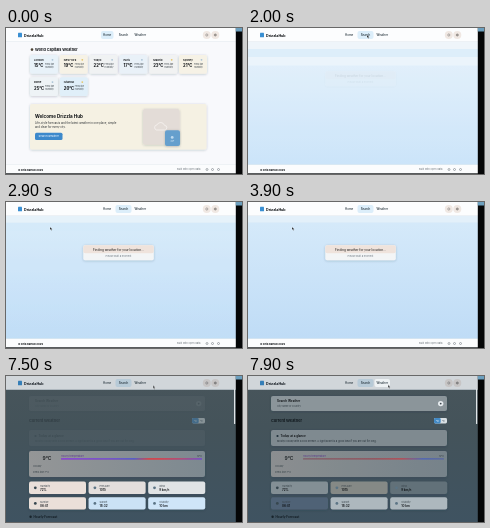
Animation of 236x146 px, one loop 8 s. Source, as an HTML page:

```html
<!DOCTYPE html>
<html lang="en">
<head>
<meta charset="utf-8">
<title>DrizzlaHub</title>
<style>
  html, body { margin: 0; width: 100%; height: 100%; overflow: hidden; background: #050607; }
  svg { display: block; width: 100vw; height: 100vh; }
  text { font-family: Inter, Roboto, sans-serif; }
</style>
</head>
<body>
<svg id="stage" viewBox="0 0 236 146" preserveAspectRatio="none">
  <defs>
    <linearGradient id="sky" x2="0" y2="1"><stop stop-color="#d6eafa"/><stop offset="1" stop-color="#bfdcf6"/></linearGradient>
    <linearGradient id="dawn" x2="0" y2="1"><stop stop-color="#e3f1fb"/><stop offset="1" stop-color="#c4e1f8"/></linearGradient>
    <linearGradient id="night" x2="0" y2="1"><stop stop-color="#48555b"/><stop offset=".35" stop-color="#44535a"/><stop offset="1" stop-color="#3f5361"/></linearGradient>
    <linearGradient id="panel"><stop stop-color="#949697"/><stop offset="1" stop-color="#7d8990"/></linearGradient>
    <linearGradient id="heat"><stop stop-color="#8a3ff0"/><stop offset=".35" stop-color="#6a52ea"/><stop offset=".52" stop-color="#3f62e8"/><stop offset=".62" stop-color="#d8434a"/><stop offset=".85" stop-color="#cf4560"/><stop offset="1" stop-color="#7c48d0"/></linearGradient>
    <linearGradient id="ember"><stop stop-color="#875a66"/><stop offset=".5" stop-color="#a34a55"/><stop offset=".7" stop-color="#d0404a"/><stop offset=".85" stop-color="#4a62c8"/><stop offset="1" stop-color="#5a68a8"/></linearGradient>
    <filter id="soft" x="-20%" y="-20%" width="140%" height="150%"><feDropShadow dx="0" dy=".6" stdDeviation=".9" flood-color="#24323c" flood-opacity=".25"/></filter>
  </defs>
</svg>
<script>
const NS = 'http://www.w3.org/2000/svg', LOOP = 8000, INK = '#0c0f12';
const stage = document.getElementById('stage');

function add(parent, tag, attrs = {}, content) {
  const el = document.createElementNS(NS, tag);
  for (const k in attrs) el.setAttribute(k, attrs[k]);
  if (content) el.textContent = content;
  parent.append(el);
  return el;
}
const group = (p = stage) => add(p, 'g');
const box = (p, x, y, width, height, fill, rx = 0, more) =>
  add(p, 'rect', { x, y, width, height, fill, rx, ...more });
const dot = (p, cx, cy, r, fill) => add(p, 'circle', { cx, cy, r, fill });
const label = (p, x, y, size, str, fill = INK, weight = 400, anchor = 'start') =>
  add(p, 'text', { x, y, fill, 'font-size': size, 'font-weight': weight, 'text-anchor': anchor }, str);
const card = (p, x, y, w, h, fill, r = 2) => box(p, x, y, w, h, fill, r, { filter: 'url(#soft)' });

// Each step holds its value until the next one.
function hold(el, prop, steps) {
  const frames = steps.map(([t, v]) => ({ offset: t / LOOP, [prop]: v, easing: 'step-end' }));
  frames.push({ offset: 1, [prop]: steps[steps.length - 1][1] });
  el.animate(frames, { duration: LOOP, iterations: Infinity });
}
const fade = (el, ...steps) => hold(el, 'opacity', steps);
const move = (el, ...steps) => hold(el, 'transform', steps.map(([t, x, y]) => [t, `translate(${x}px,${y}px)`]));

box(stage, 0, 0, 230, 146, '#f8f9fc');

// Home page
const home = group();
dot(home, 26, 21.6, 1.3, '#4a4234');
label(home, 29, 23, 3.7, 'World Capitals Weather', INK, 700);
const cities = [
  ['London', '15°C', '#e8f2f9'], ['New York', '19°C', '#f6f2e6'], ['Tokyo', '22°C', '#f0f2f3'],
  ['Paris', '17°C', '#e9f1f8'], ['Madrid', '23°C', '#f1f2f2'], ['Sydney', '21°C', '#f6f2e6'],
  ['Rome', '25°C', '#eef3f6'], ['Istanbul', '20°C', '#e0eff9']
];
cities.forEach(([name, temp, tint], i) => {
  const x = 24 + (i % 6) * 29.8, y = i < 6 ? 27 : 49.3;
  card(home, x, y, 28, 18.7, tint);
  label(home, x + 4, y + 5.6, 2.7, name, INK, 600);
  dot(home, x + 22.5, y + 4.8, .9, i % 3 === 1 ? '#e5c66b' : '#a9c3d5');
  label(home, x + 4, y + 12.4, 4.2, temp, INK, 700);
  label(home, x + 15, y + 10, 2.1, 'Feels like', '#333b41');
  label(home, x + 15, y + 12.7, 2.1, 'Humidity', '#333b41');
});

card(home, 24, 76, 176.5, 45.5, '#f5f1e3');
label(home, 29, 90, 4.6, 'Welcome Drizzla Hub', INK, 700);
label(home, 29, 96.4, 2.75, 'Life-style forecasts and the latest weather in one place, simple', '#24292d');
label(home, 29, 100.4, 2.75, 'and clear for every city.', '#24292d');
box(home, 29, 104.7, 27.5, 7.3, '#3d89cb', 1.5);
label(home, 42.7, 109.3, 2.7, 'Search weather', '#e9f4ff', 500, 'middle');
card(home, 137, 81, 36.5, 35.5, '#e3dcd7');
add(home, 'path', { d: 'M150.5 102h8a2.3 2.3 0 0 0 0-4.6a4 4 0 0 0-7.5-.5a2.6 2.6 0 0 0-.5 5.1z', fill: 'none', stroke: '#f7f3f0', 'stroke-width': .8 });
card(home, 159, 102.3, 15, 15.7, '#659fcd');
dot(home, 166.2, 109.4, 1.4, '#bed9ee');
label(home, 166.5, 113.7, 2.2, '20°', '#e1effa', 500, 'middle');
fade(home, [0, 1], [1800, .7], [1900, .3], [2000, 0]);

// Loading page
const loading = group();
const early = group(loading);
box(early, 0, 14, 230, 123, 'url(#dawn)');
box(early, 0, 14, 230, 7, '#eef5fa');
box(early, 0, 21, 230, 8, '#d8edfa');
const band = box(early, 0, 29, 230, 8.5, '#e9f4fb');
fade(band, [0, 1], [2900, 0]);
const late = group(loading);
box(late, 0, 14, 230, 123, 'url(#sky)');
box(late, 0, 14, 230, 6.5, '#e3f0fa');
fade(late, [0, 0], [2200, .35], [2300, .6], [2900, .75], [3900, 1]);
fade(loading, [0, 0], [1800, .3], [1900, .6], [2000, .85], [2100, 1], [7300, 0]);

const notice = group();
card(notice, 77.3, 43.3, 70.5, 15, '#f3f5f6', 1.8);
box(notice, 77.3, 43.3, 70.5, 8, '#efe3dc', 1.8);
label(notice, 112.5, 49, 3.05, 'Finding weather for your location...', '#33302e', 500, 'middle');
label(notice, 112.5, 54.6, 2.5, 'Please wait a moment', '#6f7a82', 400, 'middle');
fade(notice, [0, 0], [2000, .12], [2100, .28], [2200, .5], [2300, .75], [2500, 1], [7300, 0]);

// Footer shared by the first two pages
const footer = group();
box(footer, 0, 136.8, 230, 8.7, '#fbfcfd');
box(footer, 0, 136.6, 230, .4, '#dfe5e9');
label(footer, 12, 142.5, 2.7, '© DrizzlaHub 2025', INK, 700);
label(footer, 171, 142.4, 2.5, 'Built with open data', '#6a7278');
[201, 206.5, 212.5].forEach(cx => add(footer, 'circle', { cx, cy: 141.5, r: 1, fill: 'none', stroke: '#5d666c', 'stroke-width': .5 }));
box(footer, 0, 145.3, 230, .7, '#15191b');
fade(footer, [0, 1], [7300, 0]);

// Empty sky before the results arrive
const empty = group();
box(empty, 0, 14, 230, 132, 'url(#sky)');
box(empty, 0, 14, 230, 7, '#e0effa');
box(empty, 80, 144.2, 85.5, 5, '#ad9f97', 2);
fade(empty, [0, 0], [7300, 1], [7500, 0]);

// Results page
const results = group();
box(results, 0, 0, 230, 146, 'url(#night)');
fade(results, [0, 0], [7400, .55], [7500, 1]);

const place = group(results);
card(place, 23, 20, 176, 15, '#8b959a');
label(place, 29, 26.4, 3, 'Search Weather', INK, 600);
label(place, 29, 31.2, 2.4, 'City name or country', '#333e45');
dot(place, 192.7, 27.6, 2.7, '#e6ebee');
dot(place, 192.7, 27.6, .9, '#3c474e');
fade(place, [0, .1], [7600, .3], [7700, .55], [7800, .8], [7900, 1]);

const title = group(results);
label(title, 23, 45.5, 3.8, 'Current Weather', '#10181d', 700);
fade(title, [0, .35], [7600, .5], [7700, .7], [7800, .9], [7900, 1]);
const toggle = group(results);
box(toggle, 186, 42, 13, 5.4, '#d8dfe3', 1.4);
box(toggle, 186, 42, 6.7, 5.4, '#438ac5', 1.4);
label(toggle, 189.3, 45.6, 2.5, '°C', '#fff', 600, 'middle');
label(toggle, 195.6, 45.6, 2.5, '°F', '#42505a', 500, 'middle');
fade(toggle, [0, .45], [7600, .65], [7700, .8], [7800, 1]);

const advice = group(results);
card(advice, 23, 54, 176, 16, '#7f8a90');
dot(advice, 29.5, 60, 1.1, '#20303a');
label(advice, 32.5, 61, 3, 'Today at a glance', INK, 600);
label(advice, 29, 65.7, 2.5, 'Mostly cloudy with a cool breeze. A light jacket is a good idea if you are out for long.', '#222d34');
fade(advice, [0, .12], [7600, .35], [7700, .6], [7800, .85], [7900, 1]);

const summary = group(results);
card(summary, 23, 75, 176, 26, 'url(#panel)');
label(summary, 36.5, 84, 5, '9°C', INK, 500);
label(summary, 27, 91, 2.5, 'Cloudy', '#333d44');
label(summary, 27, 97, 2.5, 'Feels like 7°C', '#333d44');
label(summary, 55, 81, 2.5, 'Hourly temperature', '#5a3390');
const bar = box(summary, 55, 82.2, 141, 1.2, 'url(#ember)', .5);
const hot = box(summary, 55, 82.2, 141, 1.2, 'url(#heat)', .5);
fade(hot, [0, 1], [7600, .75], [7700, .5], [7800, .25], [7900, 0]);
label(summary, 196, 80.8, 2.3, '12°C', '#333d44', 400, 'end');
fade(summary, [0, 1], [7700, .95], [7900, .9]);

const facts = [
  ['Humidity', '72%', '#eadfd9', '#838f95'], ['Pressure', '1015', '#e3dedc', '#858986'], ['Wind', '9 km/h', '#e0e3e5', '#627179'],
  ['Sunrise', '06:41', '#eadfd9', '#506276'], ['Sunset', '18:32', '#cbe2f5', '#adb8be'], ['Visibility', '10 km', '#cfe5f8', '#adb8be']
];
facts.forEach(([name, value, bright, dim], i) => {
  const x = 23 + (i % 3) * 59.6, y = i < 3 ? 105.6 : 121.2;
  const tile = card(results, x, y, 57, 12.4, bright);
  const steps = [[0, bright]];
  for (let k = 1; k <= 4; k++) steps.push([7500 + k * 100, `color-mix(in srgb, ${dim} ${k * 25}%, ${bright})`]);
  hold(tile, 'fill', steps);
  dot(results, x + 6.3, y + 6.2, 1.4, i % 3 ? '#5b7485' : '#37474f');
  label(results, x + 11, y + 5.3, 2.4, name, '#39444b');
  label(results, x + 11, y + 9.3, 3, value, INK, 600);
});
dot(results, 24.6, 140.7, 1.2, '#18242b');
label(results, 27.5, 142, 3.1, 'Hourly Forecast', '#10191f', 600);

// Header
const header = group();
box(header, 0, 0, 230, 13.7, '#fcfdfe');
box(header, 0, 13.5, 230, .5, '#dfe6eb');
box(header, 12, 4.8, 4, 4.5, '#3a8fd2', .4);
label(header, 18, 8.6, 3.65, 'DrizzlaHub', INK, 700);
const pill = (x, w, fill) => box(header, x, 3, w, 8, fill, 2);
fade(pill(95, 12.5, '#dceefa'), [0, 1], [1800, 0]);
fade(pill(109.5, 16, '#dceefa'), [0, 0], [1800, 1]);
[200.8, 209.3].forEach((x, i) => {
  dot(header, x, 7, 4, '#f0e8e3');
  add(header, 'circle', { cx: x, cy: 7, r: 1.1, fill: i ? '#a9a09b' : 'none', stroke: '#6f6a68', 'stroke-width': .5 });
});
const shade = box(header, 0, 0, 230, 14, '#24384a');
fade(shade, [0, 0], [7400, .1], [7500, .2]);
fade(pill(109.5, 16, '#edf3f7'), [0, 0], [1300, 1], [1800, 0]);
fade(pill(126.5, 15.5, '#eef2f4'), [0, 0], [7900, 1]);
[['Home', 101.2], ['Search', 117.5], ['Weather', 134.3]].forEach(([name, x]) =>
  label(header, x, 8.2, 2.9, name, '#24323b', 500, 'middle'));

// Scrollbar and desktop edge
const thumb = box(stage, 228, 13, 1.3, 35, '#f2f5f7', .6);
fade(thumb, [0, 0], [7300, .9]);
box(stage, 229.8, 0, 6.2, 146, '#050607');
box(stage, 229.8, 0, 6.2, 3.5, '#6c9fbe');

const cursor = group();
add(cursor, 'path', { d: 'M0 0v3l.75-.65l.55 1.1l.6-.3l-.5-1h1z', fill: '#15191c', stroke: '#fff', 'stroke-width': .25 });
move(cursor, [0, 232, 140], [400, 222, 132], [500, 210, 112], [600, 196, 90], [700, 184, 73],
  [900, 130, 22], [1300, 119, 7], [2900, 44, 25], [7300, 147, 9.5], [7800, 144, 9.5], [7900, 140, 8.8]);
fade(cursor, [0, 0], [400, 1]);
</script>
</body>
</html>
```
